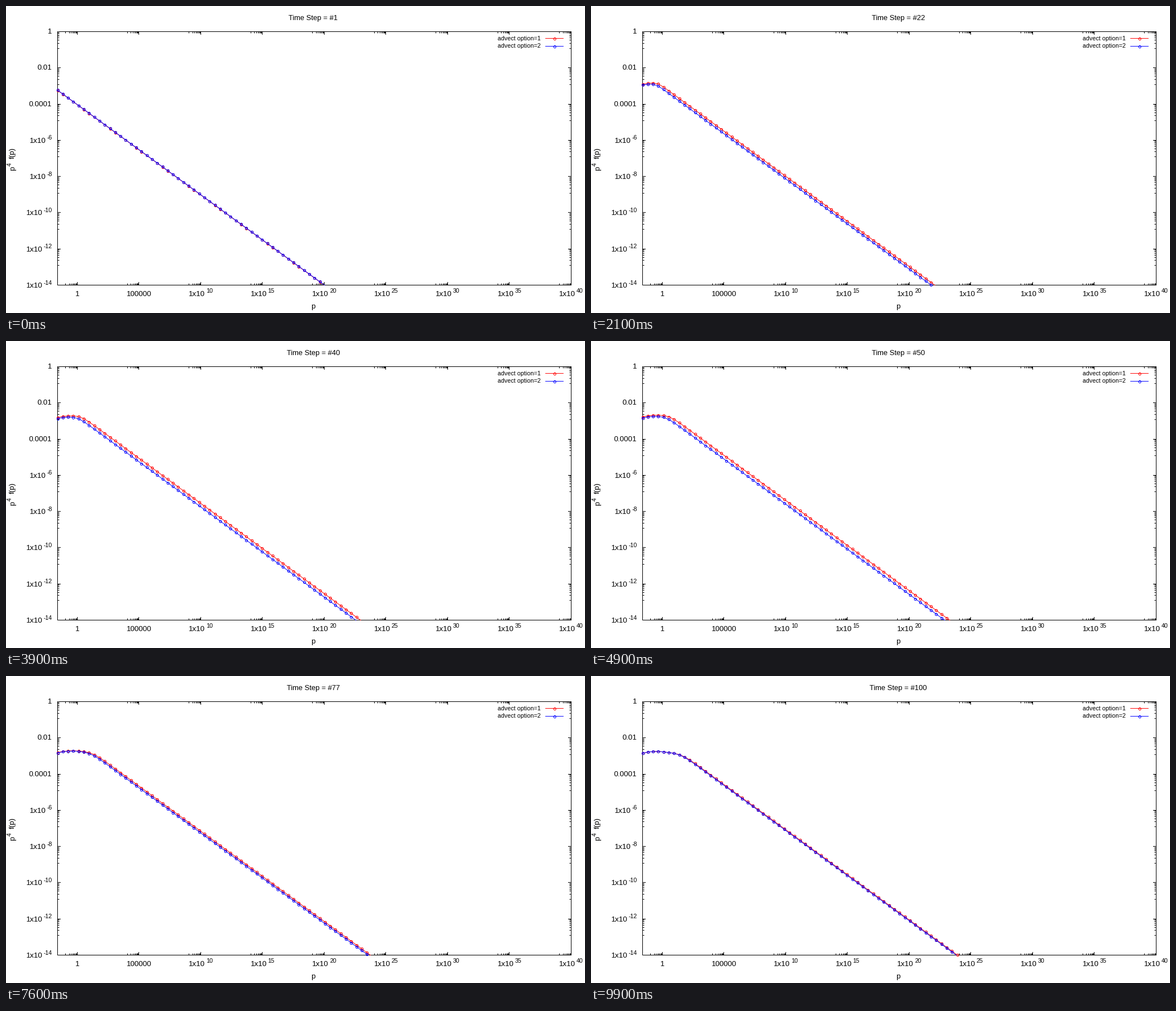
Animation, 1027 px wide and 545 px high, one loop 10 s. Source, as a matplotlib script:

```python
import numpy as np
import matplotlib.pyplot as plt
from matplotlib.animation import FuncAnimation
from matplotlib.collections import LineCollection
from matplotlib.patches import Rectangle

W, H, DPI = 1027, 545, 100
LEFT, RIGHT, TOP, BOTTOM = 91.5, 1002.5, 45.5, 495.5
X_ONE, X_DEC = 126.4, 21.9            # x of p = 1, pixels per decade
Y_DEC = (BOTTOM - TOP) / 14
SLOPE = 0.7312                        # power-law slope on screen
BIG, MID, SMALL = 13.2, 10.67, 10.6   # text heights in pixels
THIN = 72 / DPI                       # one pixel in points

plt.rcParams["font.family"] = "Liberation Sans"
fig = plt.figure(figsize=(W / DPI, H / DPI), dpi=DPI, facecolor="white")
ax = fig.add_axes([0, 0, 1, 1])
ax.set_xlim(0, W)
ax.set_ylim(H, 0)
ax.axis("off")


def label(x, y, s, size=BIG, ha="left", rot=0):
    return ax.text(x, y, s, fontsize=size * THIN, ha=ha, va="baseline",
                   rotation=rot, rotation_mode="anchor", color="black")


def power(x, y, exp):
    """Write 1x10 with a raised exponent, starting at x."""
    label(x, y, "1x10")
    label(x + 31, y - 5.3, exp, SMALL)


def exp_width(exp):
    return 30.2 + SMALL * sum(0.333 if c == "-" else 0.556 for c in exp)


def crisp(v):
    return np.floor(v) + 0.5


# Border and ticks, all on pixel centres
segs = []


def tick_x(x, n):
    if LEFT <= x <= RIGHT + 0.5:
        x = crisp(x)
        segs.append([(x, TOP), (x, TOP + n)])
        segs.append([(x, BOTTOM), (x, BOTTOM - n)])


def tick_y(y, n):
    if TOP <= y <= BOTTOM:
        y = crisp(y)
        segs.append([(LEFT, y), (LEFT + n, y)])
        segs.append([(RIGHT, y), (RIGHT - n, y)])


minor_x = np.log10(np.arange(1, 9) / 9)
minor_y = np.log10(0.01 + 0.11 * np.arange(1, 9))

for d in range(0, 41, 5):
    x = X_ONE + d * X_DEC
    tick_x(x, 5.5)
    for m in minor_x:
        tick_x(x + m * X_DEC, 3)
    if d < 10:
        label(x, 514.6, str(10 ** d), ha="center")
    else:
        power(x - exp_width(str(d)) / 2 - 0.3, 514.6, str(d))

for d in range(0, 15, 2):
    y = TOP + d * Y_DEC
    tick_y(y, 5.5)
    for m in minor_y:
        tick_y(y - m * Y_DEC, 3)
    if d < 6:
        label(81, y + 3.5, f"{10 ** -d:.{d}f}", ha="right")
    else:
        power(81.3 - exp_width(f"-{d}"), y + 4.3, f"-{d}")

ax.add_collection(LineCollection(segs, colors="black", linewidths=THIN,
                                 snap=False))
ax.add_patch(Rectangle((LEFT, TOP), RIGHT - LEFT, BOTTOM - TOP, fill=False,
                       ec="black", lw=THIN, snap=False))

# Titles
title = label(545, 25.4, "", 12.9, ha="center")
label(545, 536.8, "p", ha="center")
label(15, 292.3, "p", rot=90)
label(10.3, 283.5, "4", SMALL, rot=90)
label(15, 271, "f(p)", rot=90)

# Curves: a straight tail that shifts right, capped by a rising plateau
idx = np.arange(70)
px = LEFT + 9.3 * idx
GROW = SLOPE / Y_DEC                  # decades gained per pixel of shift
SOURCE_OFF = 64                       # the plateau sinks back after this step
KEYS = [0, 13, 29, 49, SOURCE_OFF, 99]
RED = dict(color="#ff0000", peak=129.5, rise=17.5, tau=22,
           end=[564.4, 597.5, 617, 636, 644, 649.8])
BLUE = dict(color="#0000ff", peak=131, rise=16, tau=25,
            end=[564.8, 593, 610, 627, 638, 648])


def ramp(n, start, length):
    return min(max((n - start) / length, 0), 1)


def curve(c, n):
    amp = np.interp(n, KEYS, 10 ** (GROW * (np.array(c["end"]) - LEFT)))
    end = LEFT + np.log10(amp) / GROW
    tail = BOTTOM - (end - px) * SLOPE
    sink = ramp(n, SOURCE_OFF, 18)
    flat = c["peak"] + c["rise"] * np.exp(-n / c["tau"])
    flat += (133.6 - flat) * sink
    head = flat + 3.6 * ramp(n, 0, 30) * 0.4 ** idx
    head += sink * np.maximum(idx - 3, 0)
    soft = 0.5 + 4 * ramp(n, 0, 45)
    return soft * np.logaddexp(tail / soft, head / soft)


def add_line(color, z, x=(), y=()):
    return ax.plot(x, y, color=color, lw=0.95 * THIN, zorder=z, snap=False)[0]


def add_dots(color, z, x=(), y=()):
    return ax.plot(x, y, "o", ms=4.2 * THIN, mfc="none", mec=color,
                   mew=THIN, zorder=z, snap=False)[0]


clip = Rectangle((LEFT - 0.5, TOP), RIGHT - LEFT, BOTTOM - TOP + 0.5,
                 transform=ax.transData)
series = []
for i, c in enumerate((RED, BLUE)):
    z = 5 + 2 * i
    line, dots = add_line(c["color"], z), add_dots(c["color"], z + 1)
    line.set_clip_path(clip)
    series.append((c, line, dots))
    y = 57.5 + 14 * i
    label(948, 61 + 13.4 * i, f"advect option={i + 1}", MID, ha="right")
    add_line(c["color"], z, [957, 988.5], [y, y])
    add_dots(c["color"], z + 1, [972.5], [y])


def draw(n):
    title.set_text(f"Time Step = #{n + 1}")
    for c, line, dots in series:
        y = curve(c, n)
        inside = y <= BOTTOM
        line.set_data(px, y)
        dots.set_data(px[inside], y[inside])
    return [title] + [a for s in series for a in s[1:]]


anim = FuncAnimation(fig, draw, frames=100, interval=100, repeat=True,
                     repeat_delay=0, blit=False)
plt.show()
```
